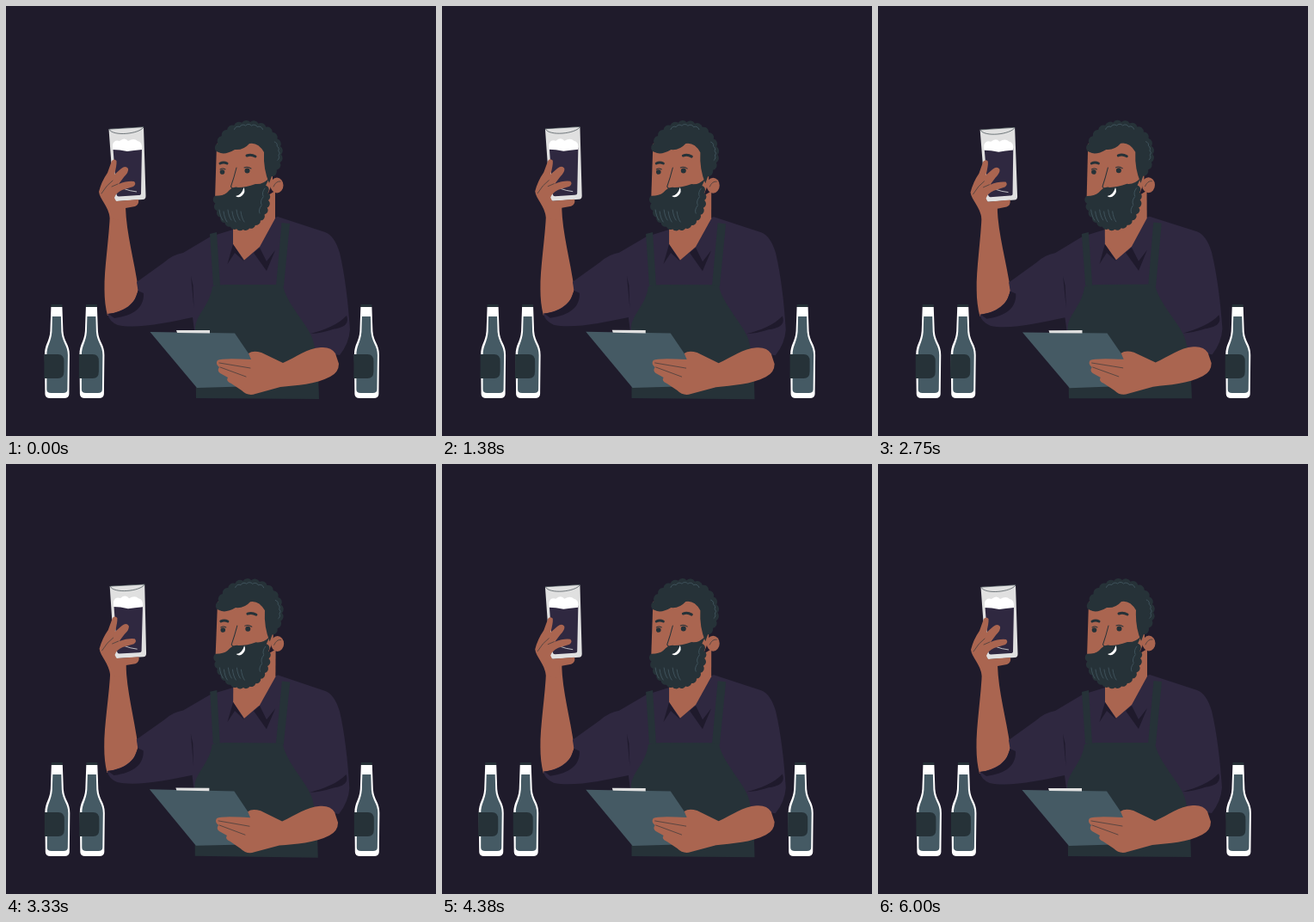
Animation, 500 px wide and 500 px high, one loop 6.04 s. Source, as an HTML page:

```html
<!DOCTYPE html>
<html lang="en">
<head>
<meta charset="utf-8">
<title>Brewer</title>
<style>
  html, body { margin: 0; height: 100%; overflow: hidden; background: #1f1b2b; }
  svg { display: block; width: 100vw; height: 100vh; }
  .skin { fill: #aa6550; }
  .shirt { fill: #2f2840; }
  .shade { fill: #1f1a2c; }
  .dark { fill: #263238; }
  .slate { fill: #455a64; }
  .white { fill: #fff; }
  .glass { fill: #e0e0e0; }
  .line { fill: none; stroke: #263238; stroke-width: .6; stroke-linecap: round; }
  .curl { fill: none; stroke: #455a64; stroke-width: .8; stroke-linecap: round; }
</style>
</head>
<body>
<svg viewBox="0 0 500 500">
  <defs>
    <g id="bottle">
      <path class="dark" d="M52 350V347H65V350Z"/>
      <path class="white" d="M52 350H65L66 378C67 391 73.500 393 73.500 406L73 451Q73 456 67 456H51Q45 456 45 451L44.500 406C44.500 393 50 391 51 378Z"/>
      <path class="slate" d="M53.500 361H63.500L64 379C65 391 71.500 395 71.500 406L71 446Q71 450 66 450H52Q47 450 47 446V406C47 395 52 391 53 379Z"/>
      <path class="dark" d="M44 405H60Q67 405 67 413V425Q67 433 60 433H44Z"/>
    </g>
  </defs>

  <g id="bottles">
    <use href="#bottle" x=".4"/>
    <use href="#bottle" x="40.900"/>
    <use href="#bottle" x="360.400"/>
  </g>

  <g id="man">
    <!-- raised forearm -->
    <path class="skin" d="M121 240C120 270 114 305 114.500 330Q114.500 346 118 360L145 354L154 330C149 295 140 265 139 234Z"/>

    <!-- shirt -->
    <path class="shirt" d="M264 260L238 268L206 287Q194 289 184 298L152 321L153.500 331C151 346 137 356 118 358Q120 367 130 371C152 376 188 368 217 362L222 400H350L388 406Q399 392 400 376C398 345 394 312 388 287Q382 267 371 263L316 245Z"/>
    <path class="shade" d="M153.500 331L160 334C161 350 149 360 126 363L119 358C138 356 151 346 153.500 331Z"/>
    <path class="shade" d="M215 314L217.500 325L218.500 351Z"/>
    <path class="shade" d="M354 381C370 377 387 370 396 360C400 371 391 374 380 376Q365 381 354 381Z"/>

    <!-- neck and collar -->
    <path class="skin" d="M264 245V277L277 295.500L295 280L313 247V215Z"/>
    <path class="shade" d="M264 277L257.500 300L266 287L277 297Z"/>
    <path class="shade" d="M288 287L303 308L313 284L303 297L295 281Z"/>

    <!-- apron -->
    <path class="dark" d="M237 265L245 263L249 325H241Z"/>
    <path class="dark" d="M320.500 252L330 253L323 326H314Z"/>
    <path class="dark" d="M240 326Q247 324 256 324H322C325 346 353 372 357 389Q363 410 364 457L221 456L220 373C223 356 237 348 240 326Z"/>

    <!-- clipboard and lower arm -->
    <path class="slate" d="M167.500 379L266 380.500L297 426L290 442L222 444Z"/>
    <path class="glass" d="M198 377H237V380.500L199 380Z"/>
    <path class="skin" d="M322 415C338 408 350 398 366 397Q378 396 383 404L387 416Q387 426 377 431C360 440 338 441 319 443L290 451Q281 454 274 447L262 439Q255 436 258 432L249 427Q245 424 248 420Q243 416 246 412Q251 409 285 411L282 404Q287 400 297 403Z"/>
    <path class="line" d="M248 415L284 421M249 420L279 431"/>

    <!-- glass -->
    <path class="glass" d="M119.500 143L160 140.500L162.500 221Q162.500 225 159 225L129 227Q126 227 125.500 224Z"/>
    <path class="line" d="M120 143.500C124 152 155 149 160 141Z"/>
    <path class="shirt" d="M124.500 166L158 165L157 218Q157 220 154 220L131 221.500Q129 221.500 128.500 219Z"/>
    <path class="white" d="M124 167V161Q126 155 132 157Q138 152 142 157Q149 153 153 157Q159 158 158 167Q148 168 141 169Q132 167 124 167Z"/>
    <path fill="none" stroke="#e0e0e0" stroke-width=".8" d="M130 207Q135 214 152 216"/>

    <!-- raised hand -->
    <path class="skin" d="M121 247C119 232 109 225 108 216Q111 204 118 194L123 180Q126 177 128.500 180Q129 185 126 196L134 189Q139 185 142 189Q143 193 137 199L131 207Q141 203 149 204Q152 207 148 210L135 214Q128 217 126 223L128 227L154 225Q155 231 150 233L139 235L138 250Z"/>
    <path class="line" d="M124 203Q117 208 111 218M130 207L123 210"/>

    <!-- head -->
    <path class="skin" d="M245 160L243 225L300 230L310 205V165L290 150Z"/>
    <ellipse class="skin" cx="315" cy="208.500" rx="7.500" ry="9"/>
    <path class="line" d="M311 210Q314 203 319 204"/>
    <path class="dark" id="hair"/>
    <path class="dark" id="beard"/>
    <path class="curl" id="curls"/>
    <path class="white" d="M267 221Q274 220 276.500 211Q279 216 275 220Q271 224 267 221Z"/>
    <path class="line" style="stroke-width:3" d="M249 183Q253 181 257 183M280 174Q285 172 290 175"/>
    <circle class="dark" cx="251.500" cy="193" r="2.800"/>
    <circle class="dark" cx="280.500" cy="191.500" r="3"/>
    <path class="line" style="stroke-width:1" d="M249 190Q252 188 255 190M277 188Q281 186 285 189M268 188Q265 200 261.500 210Q263 213 266 212"/>
  </g>
</svg>
<script>
  const $ = id => document.getElementById(id);

  // Outward curls along an elliptical arc; angles in degrees, clockwise.
  function curls(cx, cy, rx, ry, from, to, count) {
    let path = '';
    for (let i = 0; i <= count; i++) {
      const a = (from + (to - from) * i / count) * Math.PI / 180;
      const r = Math.hypot(rx, ry) * Math.abs(to - from) / count / 130;
      path += (i ? `A${r} ${r} 0 0 1 ` : 'M') + (cx + rx * Math.cos(a)) + ' ' + (cy + ry * Math.sin(a));
    }
    return path;
  }

  $('hair').setAttribute('d', curls(282, 172, 38, 37, 185, 405, 15) +
    'L306 206Q299 190 300 170Q293 158 283 160Q276 168 266 167Q254 174 247 170Z');
  $('beard').setAttribute('d', curls(274, 224, 31, 36, -25, 185, 15) +
    'Q252 221 257 217Q264 209 270 211Q279 211 290 207Q299 208 306 200Z');

  let strands = curls(282, 172, 33, 33, 240, 300, 5) + curls(282, 172, 35, 28, 330, 375, 4);
  for (let i = 0; i < 6; i++) strands += `M${248 + i * 5} ${237 + i % 2 * 2}q1 8 4 12`;
  for (let i = 0; i < 3; i++) strands += `M${301 - i * 2} ${212 + i * 10}q-4 5 -2 9`;
  $('curls').setAttribute('d', strands);

  // One swing to each side, at constant speed.
  const sway = p => 1 - Math.abs(4 * ((p + .25) % 1) - 2);

  // Ten beats left and right, doubling up to 4 px and dying away again.
  const beat = k => (-1) ** k * Math.min(4, Math.floor(2 ** (Math.min(k, 10 - k) - 1)));
  function shake(p) {
    const k = Math.floor(p * 10), part = p * 10 - k;
    return beat(k) * (1 - part) + beat(k + 1) * part;
  }

  function draw() {
    const t = performance.now() % 6040 % 6000;
    $('man').setAttribute('transform', `rotate(${sway(t / 3000)} 255 295)`);
    $('bottles').setAttribute('transform', `translate(${shake(t / 6000)})`);
    requestAnimationFrame(draw);
  }
  draw();
</script>
</body>
</html>
```
